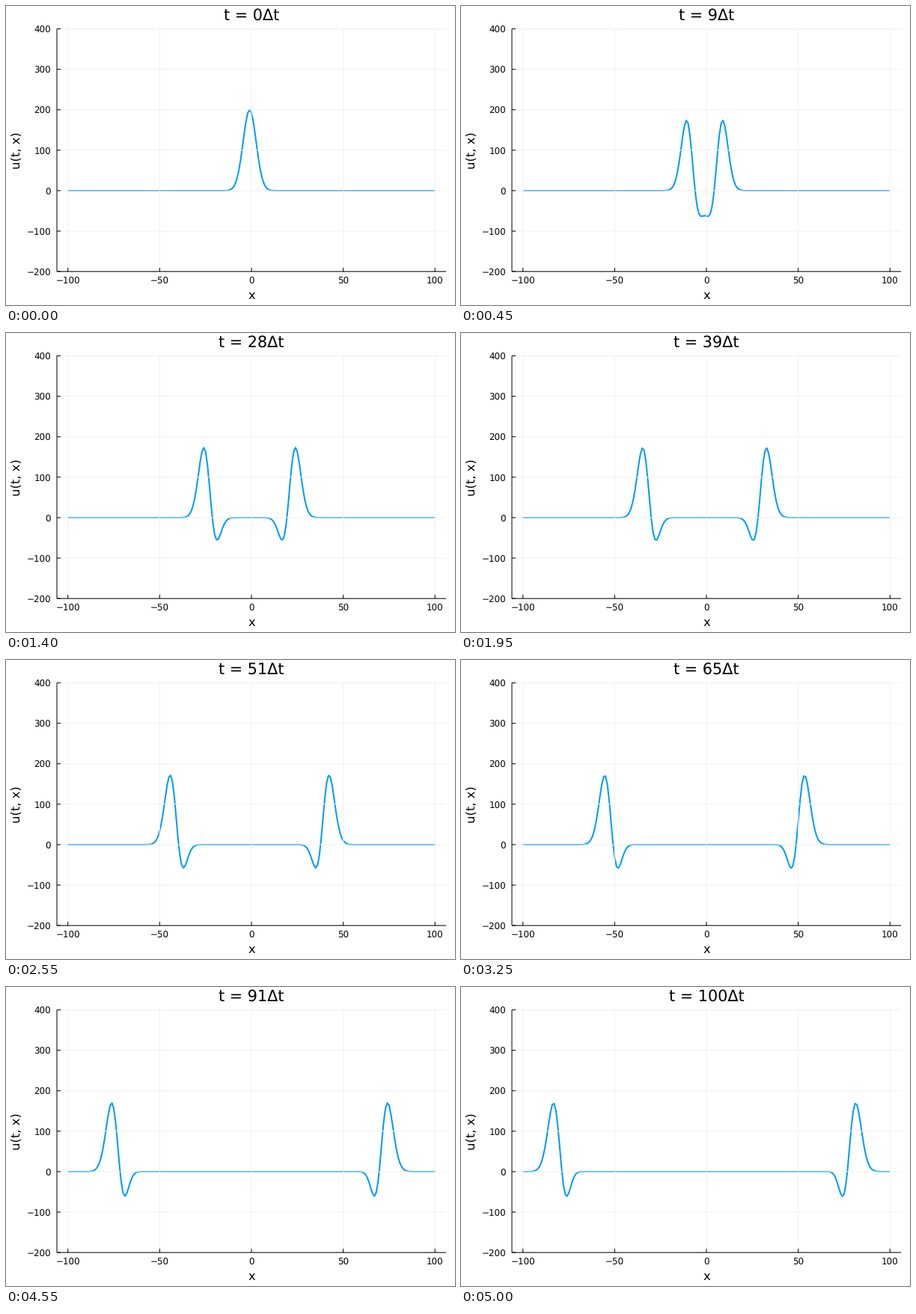
Animation, 600 px wide and 400 px high, one loop 5050 ms. Source, as a matplotlib script:

```python
import numpy as np
import matplotlib.pyplot as plt
from matplotlib.animation import FuncAnimation
from matplotlib.lines import Line2D

W, H, DPI = 600, 400, 100
PX = 72 / DPI                       # one pixel in points
LEFT, RIGHT, TOP, BOTTOM = 68, 588, 30.6, 355.2
TICK = 5
STEPS = 101

plt.rcParams.update({
    "font.family": "DejaVu Sans",
    "text.hinting": "none",
    "path.simplify": False,
})


def laplacian(u):
    return np.roll(u, 1) - 2 * u + np.roll(u, -1)


def solve_wave(x, courant=0.8):
    """Leapfrog solution of the 1D wave equation from a Gaussian pulse."""
    r2 = courant ** 2
    z2 = ((x + 1) / 5) ** 2
    bell = np.exp(-z2)
    kick = -77.2 * (1 - 2 * z2) * bell       # initial velocity times the step
    u = [200 * bell]
    u.append(u[0] + kick + 0.5 * r2 * laplacian(u[0]))
    while len(u) < STEPS:
        u.append(2 * u[-1] - u[-2] + r2 * laplacian(u[-1]))
    return u


def to_px(x):
    return LEFT + (x + 106) / 212 * (RIGHT - LEFT)


def to_py(y):
    return BOTTOM - (y + 200) / 600 * (BOTTOM - TOP)


def stroke(x0, y0, x1, y1, color="black"):
    """One pixel wide line between pixel points, y measured from the top."""
    fig.add_artist(Line2D([x0, x1], [H - y0, H - y1], color=color,
                          linewidth=PX, transform=None, snap=False,
                          solid_capstyle="butt"))


def label(x, y, text, size, **kw):
    """Text at pixel (x, y), y being the baseline measured from the top."""
    kw = {"ha": "center", "va": "baseline", **kw}
    return fig.text(x, H - y, text, fontsize=size * PX, color="black",
                    transform=None, **kw)


def signed(v):
    return str(v).replace("-", "\u2212")


fig = plt.figure(figsize=(W / DPI, H / DPI), dpi=DPI, facecolor="white")
xticks = range(-100, 101, 50)
yticks = range(-200, 401, 100)

for v in xticks:
    stroke(to_px(v), TOP, to_px(v), BOTTOM, "#f0f0f0")
for v in yticks:
    stroke(LEFT, to_py(v), RIGHT, to_py(v), "#f0f0f0")
stroke(LEFT, TOP, LEFT, BOTTOM)
stroke(LEFT, BOTTOM, RIGHT, BOTTOM)

for v in xticks:
    stroke(to_px(v), BOTTOM, to_px(v), BOTTOM - TICK)
    label(to_px(v), 372, signed(v), 11.9)
for v in yticks:
    stroke(LEFT, to_py(v), LEFT + TICK, to_py(v))
    label(60.2, to_py(v) + 5.5, signed(v), 11.9, ha="right")

label(328, 392, "x", 16.35)
label(19, 193, "u(t, x)", 16.35, rotation=90, rotation_mode="anchor")
title = label(328, 19, "", 20.8)

ax = fig.add_axes([LEFT / W, 1 - BOTTOM / H,
                   (RIGHT - LEFT) / W, (BOTTOM - TOP) / H])
ax.set(xlim=(-106, 106), ylim=(-200, 400))
ax.axis("off")
x = np.arange(-100, 101)
waves = solve_wave(x)
curve, = ax.plot(x, waves[0], color="#009afa", linewidth=2 * PX, snap=False,
                 solid_joinstyle="round", solid_capstyle="butt")


def draw(i):
    curve.set_ydata(waves[i])
    title.set_text(f"t = {i}Δt")
    return curve, title


anim = FuncAnimation(fig, draw, frames=STEPS, interval=50, repeat=True)
plt.show()
```
